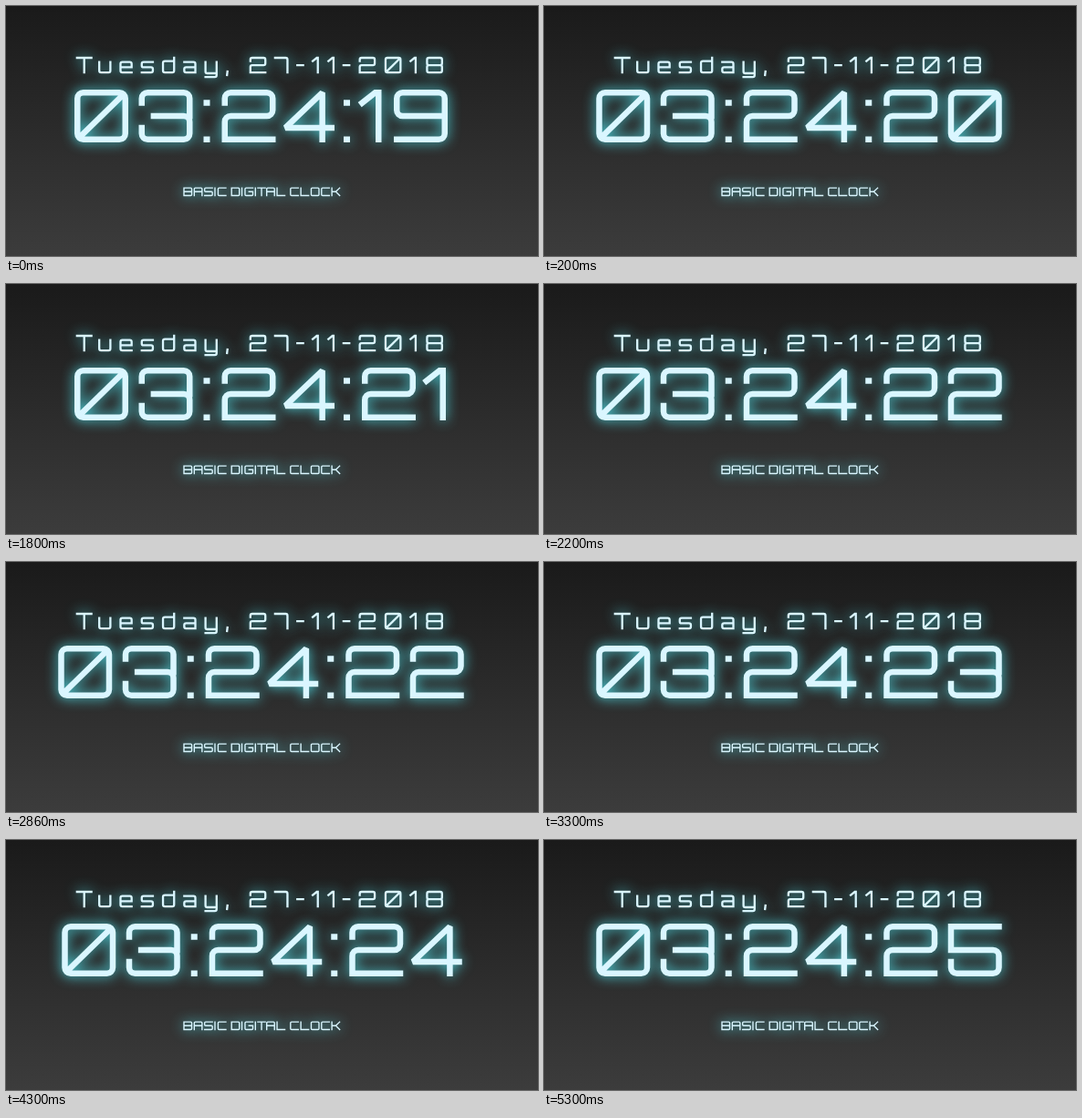
An HTML page with a canvas for the animation above (6 s loop, 583 by 275 pixels).

```html
<!DOCTYPE html>
<html lang="en">
<head>
<meta charset="utf-8">
<title>Basic digital clock</title>
<style>
  html, body { margin: 0; width: 100%; height: 100%; overflow: hidden; }
  body { background: linear-gradient(#1a1a1a, #3c3c3c); }
  canvas { display: block; }
</style>
</head>
<body>
<canvas id="clock" width="583" height="275" role="img" aria-label="Basic digital clock"></canvas>
<script>
// Each letter in a path names a node of a 5 x 5 grid, a-e in the top row
// to u-y in the bottom row. Capitals are sharp corners, others are rounded.
const COLS = [0, 0.25, 0.5, 0.8, 1];
const ROWS = [0, 0.22, 0.5, 0.75, 1];
const PATHS = {
  0: 'ceyuac mEUm', 1: 'fDEy', 2: 'faeokUy', 3: 'faeo loyup', 4: 'tPDx',
  5: 'eAKoyup', 7: 'aey', 8: 'ceokac moyukm', 9: 'okaeyu',
  ':': 'fj uy', '-': 'ko', ',': 'eu', ' ': '',
  A: 'uaey ko', B: 'kAeo koyUk', C: 'eauy', D: 'kAeyUk', G: 'eauyOm', I: 'au',
  K: 'au kMe my', L: 'aUy', O: 'ceyuac', S: 'eakoyu', T: 'ae cw',
  a: 'aeYuko', d: 'eyufj', e: 'kOeauy', s: 'eakoyu', u: 'auye', y: 'apt eyu'
};

// Font units: capitals are 58 high. Each box is [advance, left, right].
const CAP = 58, HALF_PEN = 3.25, RADIUS = 6.5;
const WIDE = [66.5, 6, 65], SMALL = [50.5, 3, 48.5];
const BOXES = {
  1: [31, 3, 27.5], 4: [58.5, 2, 59], 7: [55, 2, 52], T: [52, 1, 58],
  ':': [16.5, 6.5, 13.5], '-': [28, 1, 28], ',': [14, 4, 12],
  ' ': [18, 0, 0], I: [18, 6, 12.5]
};
const TOPS = { d: 0, ',': 48 };
const BOTTOMS = { y: 74, ',': 67 };

const LOOP = 6000;
const TICKS = [200, 1200, 2200, 3300, 4300, 5300];
const ctx = document.getElementById('clock').getContext('2d');

const isSmall = c => /[a-z]/.test(c);
const box = c => BOXES[c] || (isSmall(c) ? SMALL : WIDE);
const width = (text, gap) => [...text].reduce((w, c) => w + box(c)[0] + gap, 0);
const mix = (a, b, k) => a + (b - a) * k;

function tracePath(path, c, pen) {
  const [, left, right] = box(c);
  const top = TOPS[c] ?? (isSmall(c) ? 15 : 0);
  const bottom = BOTTOMS[c] ?? CAP;
  const points = [...path].map(key => {
    const node = key.toLowerCase().charCodeAt(0) - 97;
    return {
      x: pen + mix(left + HALF_PEN, right - HALF_PEN, COLS[node % 5]),
      y: mix(top + HALF_PEN, bottom - HALF_PEN, ROWS[Math.floor(node / 5)]),
      sharp: key < 'a'
    };
  });
  points.forEach((p, i) => {
    const next = points[i + 1];
    if (i === 0) ctx.moveTo(p.x, p.y);
    else if (!next || p.sharp) ctx.lineTo(p.x, p.y);
    else ctx.arcTo(p.x, p.y, next.x, next.y, RADIUS);
  });
}

// x, y: left and top of the capitals; gap: letter spacing in font units.
function write(text, x, y, size, gap) {
  const scale = size / 80;
  ctx.save();
  ctx.translate(x, y);
  ctx.scale(scale, scale);
  ctx.lineWidth = 2 * HALF_PEN - 0.4 + 0.4 / scale;
  ctx.beginPath();
  let pen = 0;
  for (const c of text) {
    PATHS[c].split(' ').forEach(path => tracePath(path, c, pen));
    pen += box(c)[0] + gap;
  }
  ctx.stroke();
  ctx.restore();
}

function draw(t) {
  const time = '03:24:' + (19 + TICKS.filter(at => t >= at).length);
  ctx.clearRect(0, 0, 583, 275);
  ctx.strokeStyle = '#daf6ff';
  ctx.lineCap = 'square';
  ctx.miterLimit = 2;
  ctx.shadowColor = 'rgb(80, 225, 235)';
  ctx.shadowBlur = 14;
  write('Tuesday, 27-11-2018', 76.5, 56, 25, 24);
  write(time, 279.25 - width(time, 4) / 2, 92, 80, 4);
  write('BASIC DIGITAL CLOCK', 193.5, 199.6, 13, 3.2);
}

const start = performance.now();
function tick() {
  draw((performance.now() - start) % LOOP);
  requestAnimationFrame(tick);
}
tick();
</script>
</body>
</html>
```
